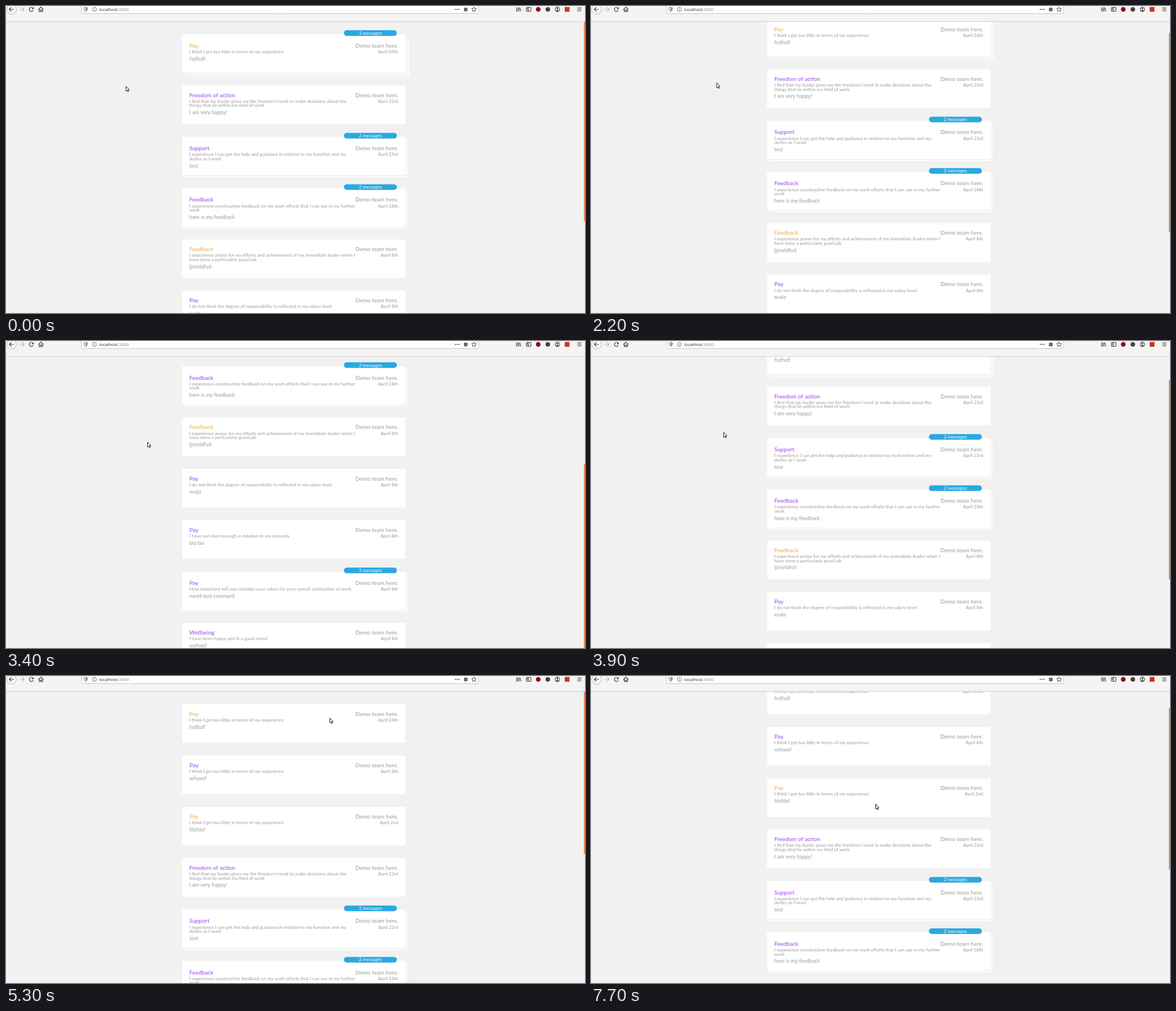
An HTML page with a canvas for the animation above (8000 ms loop, 1028 by 545 pixels).

```html
<!DOCTYPE html>
<html lang="en">
<head>
<meta charset="utf-8">
<title>Messages</title>
<style>
html, body { margin: 0; width: 100%; height: 100%; overflow: hidden; background: #f1f1f1; }
canvas { display: block; }
</style>
</head>
<body>
<canvas id="stage" width="1028" height="545"></canvas>
<script>
const ctx = document.getElementById('stage').getContext('2d');
const W = 1028, H = 545, LOOP = 8000;
const PURPLE = '#9a42f4', ORANGE = '#ecab50', BLUE = '#29a9e1', GRAY = '#9a9a9a', INK = '#3f3f41';
const VIEW_TOP = 28, FIRST_TOP = 50, PITCH = 91.12, EXPAND_AT = 4800;

const card = (color, title, question, answer, date, count = 1) =>
  ({ color, title, question, answer, date, count });

const tooLittle = ['I think I get too little in terms of my experience'];
const rest = [
  card(PURPLE, 'Freedom of action',
    ['I find that my leader gives me the freedom I need to make decisions about the',
     'things that lie within my field of work'], 'I am very happy!', 'April 23rd'),
  card(PURPLE, 'Support',
    ['I experience I can get the help and guidance in relation to my function and my',
     'duties as I need'], 'test', 'April 23rd', 2),
  card(PURPLE, 'Feedback',
    ['I experience constructive feedback on my work efforts that I can use in my further',
     'work'], 'here is my feedback', 'April 18th', 2),
  card(ORANGE, 'Feedback',
    ['I experience praise for my efforts and achievement of my immediate leader when I',
     'have done a particularly good job'], 'ljsnvldfvd', 'April 8th'),
  card(PURPLE, 'Pay',
    ['I do not think the degree of responsibility is reflected in my salary level'],
    'evala', 'April 8th'),
  card(PURPLE, 'Pay', ['I have not risen enough in relation to my seniority'], 'bla bla', 'April 8th'),
  card(PURPLE, 'Pay',
    ['How important will you consider your salary for your overall satisfaction at work'],
    'nareli test comment', 'April 8th', 2),
  card(PURPLE, 'Wellbeing', ['I have been happy and in a good mood'], 'wefwef', 'April 8th')
];
const collapsed = [card(ORANGE, 'Pay', tooLittle, 'fsdfsdf', 'April 24th', 3), ...rest];
const expanded = [
  card(ORANGE, 'Pay', tooLittle, 'fsdfsdf', 'April 24th'),
  card(PURPLE, 'Pay', tooLittle, 'wfewef', 'April 8th'),
  card(ORANGE, 'Pay', tooLittle, 'fdsfdsf', 'April 2nd'),
  ...rest
];

// The screen refreshes in coarse steps, with one long stall and a slower end.
const every = (from, to, step) =>
  Array.from({ length: Math.floor((to - from) / step) + 1 },
    (_, i) => Math.round((from + i * step) / 100) * 100);
const ticks = [...every(0, 2500, 100), ...every(3400, 6300, 240), ...every(6580, 7700, 280)];
const lastTick = t => ticks.filter(k => k <= t).pop();

function scrollAt(t) {
  if (t < 2000) return 0;
  if (t <= 2500) return 180 * ((t - 2000) / 500) ** 2;
  if (t < 7500) return Math.max(0, 278.6 - 0.437 * (t - 3400));
  return 50.8;
}

// Mouse waypoints: time, x, y
const waypoints = [
  [0, 212.5, 142], [500, 213, 141], [1200, 218, 135], [1600, 218, 135], [1900, 220.5, 135],
  [2500, 223.5, 136.5], [3400, 251, 179], [3900, 235, 161.5], [4100, 488, 177],
  [4400, 496, 116], [4800, 497, 110], [5100, 497, 121], [5300, 574.5, 74], [5600, 571, 183],
  [6000, 565, 293], [6300, 543, 96], [6600, 535, 177], [6900, 522, 278], [7400, 505, 227]
];

function cursorAt(t) {
  const next = waypoints.findIndex(p => p[0] > t);
  if (next < 0) return waypoints[waypoints.length - 1].slice(1);
  const [t0, x0, y0] = waypoints[next - 1], [t1, x1, y1] = waypoints[next];
  const k = Math.sin((t - t0) / (t1 - t0) * Math.PI / 2);
  return [x0 + (x1 - x0) * k, y0 + (y1 - y0) * k];
}

function text(str, x, y, size, color, align = 'left', family = 'Lato') {
  ctx.font = `${size}px ${family}, sans-serif`;
  ctx.textAlign = align;
  ctx.fillStyle = color;
  ctx.fillText(str, x, y);
}

function paint(shape, fill, stroke) {
  if (fill) { ctx.fillStyle = fill; ctx.fill(shape); }
  if (stroke) { ctx.strokeStyle = stroke; ctx.stroke(shape); }
}

function box(x, y, w, h, r, fill, stroke) {
  const p = new Path2D();
  p.roundRect(x, y, w, h, r);
  paint(p, fill, stroke);
}

function dot(x, y, r, fill, stroke) {
  const p = new Path2D();
  p.arc(x, y, r, 0, Math.PI * 2);
  paint(p, fill, stroke);
}

function path(d, x, y, stroke, fill) {
  ctx.save();
  ctx.translate(x, y);
  paint(new Path2D(d), fill, stroke);
  ctx.restore();
}

function drawCard(c, top) {
  const x = 312.5, w = 397, h = 68.5, left = 325.5, right = 696.3;
  const stacked = c.count > 1;
  for (let i = c.count - 1; i >= 0; i--) {
    const o = i * 3;
    if (i < c.count - 1) box(x + o + 1, top + o + 1, w, h, 2, '#e6e6e6');
    box(x + o, top + o, w, h, 2, '#fff');
  }
  if (stacked) {
    box(600, top - 6.9, 94, 10, 5, BLUE);
    text(`${c.count} messages`, 647, top + 0.8, 8.2, '#fff', 'center');
  }
  const y = top + (stacked ? 3.4 : 0);
  text(c.title, left, y + 20.5, 10.2, c.color);
  text('Demo team here.', right, y + 20.5, 10, GRAY, 'right');
  text(c.date, right, y + 30.8, 8.1, GRAY, 'right');
  c.question.forEach((line, i) => text(line, left, y + 30.8 + i * 7.5, 8.2, GRAY));
  text(c.answer, left, y + 43.6 + (c.question.length - 1) * 7.5, 9.3, GRAY);
}

function drawPage(t) {
  const scroll = scrollAt(t);
  const open = t >= EXPAND_AT;
  ctx.fillStyle = '#f1f1f1';
  ctx.fillRect(0, 0, W, H);
  (open ? expanded : collapsed).forEach((c, i) => drawCard(c, FIRST_TOP + i * PITCH - scroll));
  const [ratio, length] = open ? [0.55, 288] : [0.685, 354];
  box(1026, VIEW_TOP + scroll * ratio, 2.5, length, 1, '#ef8354');
}

function drawAddressBar() {
  ctx.lineWidth = 1;
  box(134, -6, 705, 19.5, 1.5, '#fff', '#c8c5c1');
  ctx.lineWidth = 0.9;
  path('M0 -3.9L3.2 -2.8C3.2 1 2 3 0 4C-2 3 -3.2 1 -3.2 -2.8Z', 141.5, 6, '#5c5c5e');
  path('M0 -2.8V2.8C1.3 2 2 .4 2.1 -2Z', 141.5, 6, null, '#5c5c5e');
  dot(157, 6, 3.7, null, '#6b6b6d');
  path('M0 -.5V2.2M0 -2.2V-1.3', 157, 6, '#6b6b6d');

  text('localhost', 165.5, 8.9, 7.8, '#2b2b2d', 'left', 'Open Sans');
  text(':3000', 198.2, 8.9, 7.8, '#858587', 'left', 'Open Sans');

  for (let i = -1; i <= 1; i++) dot(801 + i * 3.2, 6, 1, INK);
  box(813, 3, 6.5, 6.5, 1, '#6a6a6c');
  const star = Array.from({ length: 10 }, (_, i) => {
    const a = (i / 5 - 0.5) * Math.PI, r = i % 2 ? 2 : 4.5;
    return `${(r * Math.cos(a)).toFixed(2)} ${(r * Math.sin(a)).toFixed(2)}`;
  });
  path(`M${star.join('L')}Z`, 831, 6.2, INK);
}

function drawToolbar() {
  ctx.fillStyle = '#f5f4f2';
  ctx.fillRect(0, 0, W, 27);
  ctx.fillStyle = '#d0cecb';
  ctx.fillRect(0, 27, W, 1);

  ctx.lineWidth = 1;
  dot(10, 6, 8.5, '#fbfbfa', '#b5b3b0');
  ctx.lineWidth = 1.2;
  path('M4.2 0H-4M-.3 -3.8L-4.1 0L-.3 3.8', 10, 6, INK);
  path('M-4.2 0H4M.3 -3.8L4.1 0L.3 3.8', 28, 6, '#bab8b6');
  path('M3 -2A3.6 3.6 0 1 0 3.5 1.2', 45, 6, INK);
  path('M4.2 -4.3V-.6H.5Z', 45, 6, null, INK);
  path('M-4.5 .3L0 -4L4.5 .3M-3 -.6V4H-1V1H1V4H3V-.6', 62, 6, INK);

  drawAddressBar();

  ctx.lineWidth = 1.1;
  path('M-3.5 -3.5V3.7M-1.2 -3.5V3.7M1 -3.5V3.7M2.4 -3L4.4 3.7', 910, 6, INK);
  box(924, 2.5, 8, 7, 1, null, INK);
  path('M-.7 -3.5V3.5M-3 -1.5H-1.5M-3 .3H-1.5', 928, 6, INK);
  dot(945, 6, 4.2, '#8e0b18');
  dot(962, 6, 4.1, '#454547');
  dot(979, 6, 3.9, null, INK);
  dot(979, 4.9, 1.4, INK);
  path('M-2.5 2.4C-1.5 .8 1.5 .8 2.5 2.4C1.2 3.6 -1.2 3.6 -2.5 2.4Z', 979, 6, null, INK);
  box(992, 1.8, 8.5, 8.5, 0.5, '#c73526');
  path('M-3.7 -2.7H3.7M-3.7 0H3.7M-3.7 2.7H3.7', 1018, 6, INK);
}

function drawCursor(t) {
  const [x, y] = cursorAt(t);
  ctx.lineWidth = 1;
  path('M.5 .5V9.2L2.4 7.5L3.8 10.4L5.1 9.8L3.8 7H6.5Z', x, y, '#1c1c1c', '#fff');
}

function frame() {
  const t = lastTick(performance.now() % LOOP);
  drawPage(t);
  drawToolbar();
  drawCursor(t);
  requestAnimationFrame(frame);
}
ctx.lineJoin = 'round';
frame();
</script>
</body>
</html>
```
